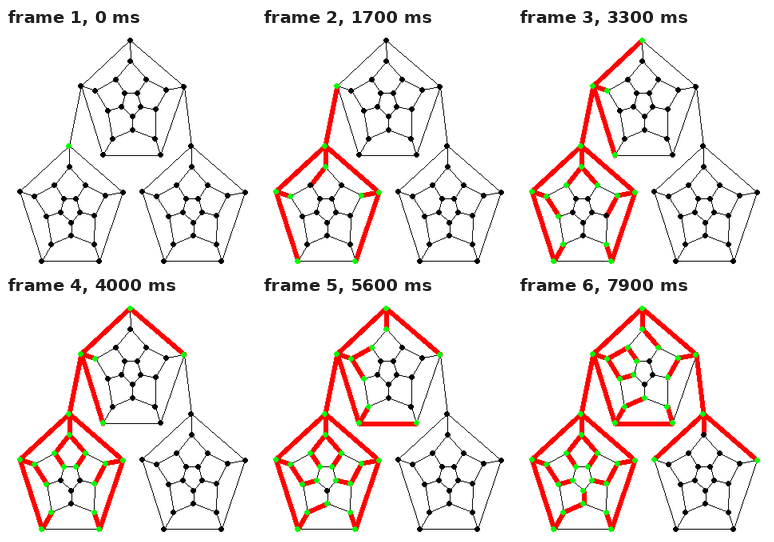
An HTML page for the animation above (8 s loop, 313 by 300 pixels).

```html
<!DOCTYPE html>
<html lang="en">
<head>
<meta charset="utf-8">
<title>Breadth-first search on three dodecahedra</title>
<style>
  html, body { margin: 0; width: 100%; height: 100%; overflow: hidden; background: #fff; }
  svg { display: block; shape-rendering: crispEdges; }
</style>
</head>
<body>
<svg width="313" height="300" viewBox="0 0 313 300">
  <g id="lines"></g>
  <g id="tree" stroke="#f00" stroke-width="6" stroke-linecap="round"></g>
  <g id="dots"></g>
</svg>
<script>
const STEP = 100, LOOP = 8000;

// One dodecahedron: five outer corners, two middle rings, inner pentagon
const solid = {
  T: [78.7, 147.3], L: [17, 204.3], R: [146.2, 205.3], BL: [44.7, 291.1], BR: [116.5, 291.1],
  t: [79.3, 173.3], l: [35, 210.3], r: [124, 209.3], bl: [56.5, 270.3], br: [110, 270.3],
  a: [60.5, 196.3], b: [99, 196.3], c: [50.5, 235.3], d: [110.7, 234.1], e: [81.5, 259.3],
  p: [72, 213.3], q: [87.7, 213.3], u: [68, 230.3], v: [92, 230.3], w: [81.5, 243.1]
};
const solidEdges = ('T-L T-R T-t L-BL L-l R-BR R-r BL-BR BL-bl BR-br ' +
  't-a t-b l-a l-c r-b r-d bl-c bl-e br-d br-e ' +
  'a-p b-q c-u d-v e-w p-q p-u q-v u-w v-w').split(' ').map(s => s.split('-'));
const offsets = [[0, 0], [76.5, -132.2], [153, 0]];

const nodes = {}, edges = [];
const link = (m, n) => {
  edges.push([m, n]);
  nodes[m].next.push(n);
  nodes[n].next.push(m);
};
offsets.forEach(([dx, dy], i) => {
  for (const [name, [x, y]] of Object.entries(solid))
    nodes[name + i] = { x: x + dx, y: y + dy, next: [] };
  solidEdges.forEach(([m, n]) => link(m + i, n + i));
});
link('T0', 'L1');
link('R1', 'T2');

// Search tree in order of discovery
const seen = new Set(['T0']), found = [];
for (const m of seen)
  for (const n of nodes[m].next)
    if (!seen.has(n)) {
      seen.add(n);
      found.push([m, n]);
    }

const add = (parent, tag, attrs) => {
  const el = document.createElementNS('http://www.w3.org/2000/svg', tag);
  for (const k in attrs) el.setAttribute(k, attrs[k]);
  return document.getElementById(parent).appendChild(el);
};

// Lines end on the nearest pixel, dots sit on the pixel that holds the node
const pixel = name => [Math.round(nodes[name].x), Math.round(nodes[name].y)];

// Thin line as single pixels
function pixelLine([m, n]) {
  const [x1, y1] = pixel(m), [x2, y2] = pixel(n);
  const count = Math.max(Math.abs(x2 - x1), Math.abs(y2 - y1));
  let d = '';
  for (let i = 0; i <= count; i++) {
    const x = Math.round(x1 + (x2 - x1) * i / count);
    const y = Math.round(y1 + (y2 - y1) * i / count);
    d += `M${x} ${y}h1v1h-1z`;
  }
  return d;
}
add('lines', 'path', { d: edges.map(pixelLine).join('') });

const branches = found.map(([m, n]) => {
  const [x1, y1] = pixel(m), [x2, y2] = pixel(n);
  return add('tree', 'line', { x1, y1, x2, y2, transform: 'translate(.5 .5)' });
});
for (const n of Object.values(nodes))
  n.dot = add('dots', 'circle', { cx: Math.floor(n.x) + 0.5, cy: Math.floor(n.y) + 0.5, r: 3.3 });
nodes.T0.dot.setAttribute('fill', '#0f0');

// Each discovery takes two steps: first the edge, then its end node
let shown = -1;
function draw(now) {
  const step = Math.floor(now % LOOP / STEP);
  if (step !== shown) {
    shown = step;
    found.forEach(([, n], i) => {
      branches[i].setAttribute('visibility', step > 2 * i ? 'visible' : 'hidden');
      nodes[n].dot.setAttribute('fill', step > 2 * i + 1 ? '#0f0' : '#000');
    });
  }
}
const start = performance.now();
function tick() {
  draw(performance.now() - start);
  requestAnimationFrame(tick);
}
tick();
</script>
</body>
</html>
```
